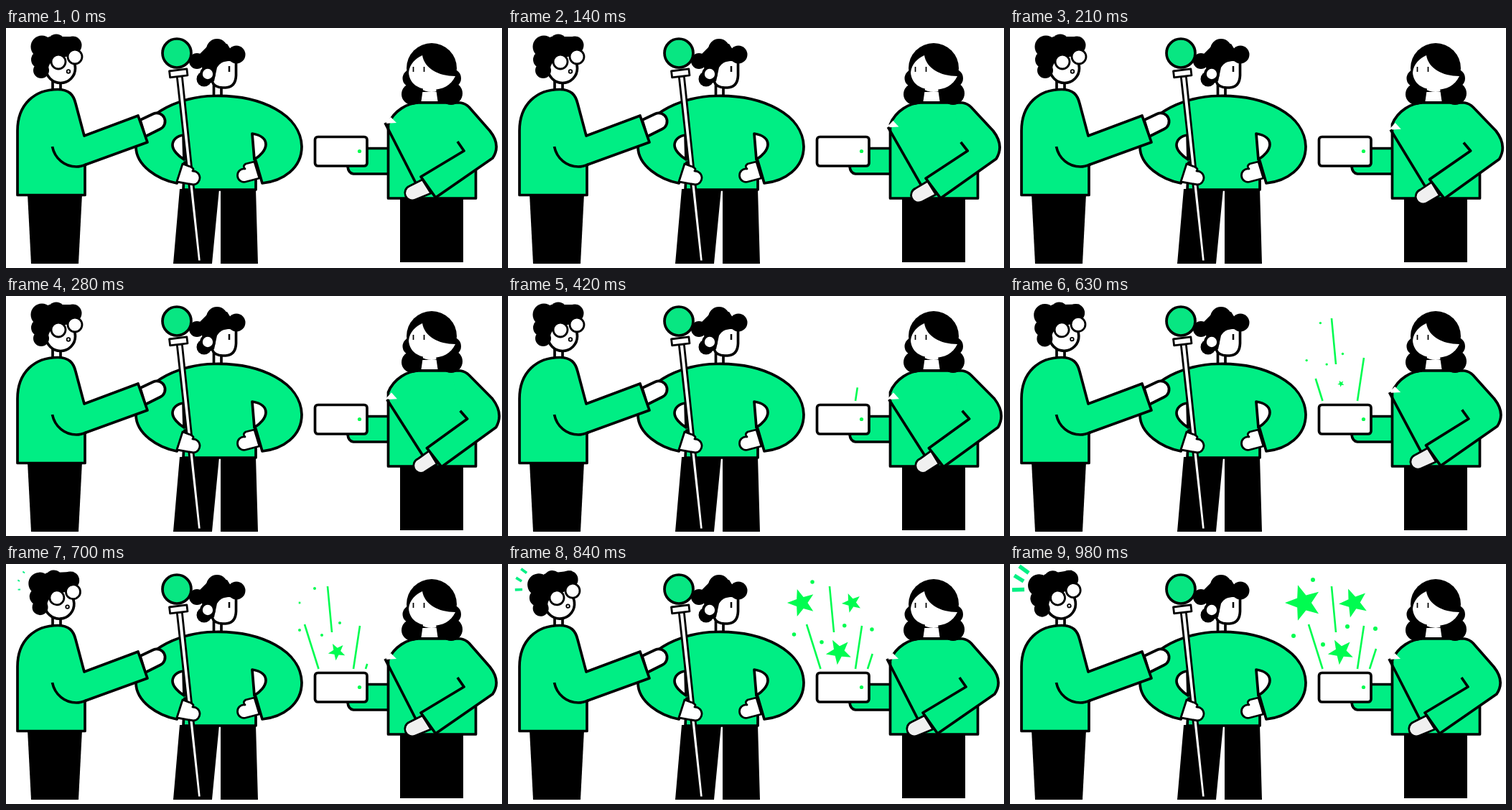
Write an HTML page that moves like this. It is 691 px wide and 334 px high and loops after 2030 ms.

```html
<!DOCTYPE html>
<html lang="en">
<head>
<meta charset="utf-8">
<title>Three people and a phone</title>
<style>
  html, body { margin: 0; width: 100%; height: 100%; overflow: hidden; background: #fff; }
  svg { display: block; width: 691px; height: 334px; }
  .o { stroke: #000; stroke-width: 3.7; stroke-linejoin: round; }
  .thin { stroke-width: 2.8; }
  .g { fill: #00ee84; }
  .w { fill: #fff; }
  .l { fill: none; }
  #burst { fill: #00fc50; }
  #burst path { stroke: #00fc50; stroke-width: 2.6; }
  #burst .dash { stroke: #00f084; }
</style>
</head>
<body>
<svg viewBox="0 0 691 334">
  <!-- middle man -->
  <path d="M242 224H297L287 328H233ZM299 224H348L351 328H299Z"/>
  <path class="o w" d="M289.500 78V98H300V78Z"/>
  <path class="o g" d="M247 225L249 187L238 216C212 211 181 192 181 165C182 124 238 95 290 94.500C356 93 411 121 412 165C412 195 386 213 357 216L348 185V225Z"/>
  <path class="o w" d="M247 149C238 150 232 156 232 163C232 170 240 178 248 183Z"/>
  <path class="o w" d="M343 147C356 149 362 155 362 162C362 170 354 178 346 183Z"/>
  <path class="o w thin" d="M346 186L334 189Q329 192 333 196A9.200 9.200 0 1 0 334 214L353 209Z"/>
  <path class="o w thin" d="M238.200 67H245.300L272.300 325H266.800Z"/>
  <rect class="o w thin" x="228" y="58.500" width="24.500" height="9" transform="rotate(-7 240 63)"/>
  <path class="o w thin" d="M246 189L257 193Q263 196 260 199A9.500 9.500 0 0 1 261 218L238 214Z"/>
  <path class="o w" d="M287 48V74Q290 83 302 83H306Q320 82 320.500 66V42Z"/>
  <path d="M268 38L282 24L308 22L322 44L318 47Q301 43 294 55L290 74L282 78L274 58Z"/>
  <circle cx="266" cy="46" r="11"/>
  <circle cx="294" cy="30" r="15"/>
  <circle cx="321" cy="37" r="12.500"/>
  <circle cx="276" cy="71" r="10.500"/>
  <circle class="o w" cx="281" cy="64" r="9"/>
  <circle class="o" cx="238" cy="35" r="20" fill="#08e682"/>
  <path class="o" d="M311 53V61" style="stroke-width:2.500"/>

  <!-- left man -->
  <path d="M30 231H106L101 328H35Z"/>
  <path class="o w" d="M65 72V90H76V72Z"/>
  <path class="o w" d="M187 128L205 119.500A11.500 11.500 0 0 1 215 140.500L194 151Z"/>
  <path class="o g" d="M16 232.500V143C16 106 40 85.500 72 85.500C88 85.500 94 93 97 105L109 150L184 122L197 159L110 190.500V232.500Z"/>
  <path class="o l" d="M64.500 165C68 182 82 193 98 193Q104 193 112 190"/>
  <g id="head">
    <circle class="o w" cx="76" cy="56" r="20.500"/>
    <path d="M38 30L60 12H98V30L84 40L66 42L60 52L56 66L42 56Z"/>
    <circle cx="50" cy="26" r="15.500"/>
    <circle cx="70" cy="21" r="12.500"/>
    <circle cx="93" cy="24" r="12.500"/>
    <circle cx="47" cy="44" r="12"/>
    <circle cx="49" cy="59" r="11"/>
    <circle class="o w thin" cx="73" cy="47" r="10"/>
    <circle class="o w thin" cx="96" cy="40" r="10"/>
    <circle class="w" cx="87" cy="60.500" r="2.300" stroke="#000" stroke-width="1.800"/>
  </g>

  <!-- woman -->
  <path d="M549 236H637V326H549Z"/>
  <path class="o g" d="M534 167.500H500L476 193Q477 202 484 203H534"/>
  <rect class="o w" x="430.500" y="151.500" width="72.500" height="40.500" rx="4"/>
  <circle cx="492.500" cy="171.500" r="2.600" fill="#00fc50"/>
  <path class="o g" d="M625 104H575C560 104 540 115 532.500 134V237H654.500V195"/>
  <path id="arm" class="o g"/>
  <path id="notch" class="w"/>
  <path id="wand" class="o"/>
  <path id="hand" class="o thin" fill="#f0f0f0"/>
  <circle cx="593" cy="56" r="35"/>
  <circle cx="565" cy="70" r="12.500"/>
  <circle cx="566" cy="92" r="15"/>
  <circle cx="621" cy="70" r="13"/>
  <circle cx="620" cy="91" r="16"/>
  <path d="M560 70H626V98L618 104H566Z"/>
  <path class="w" d="M581 84H599L601.500 102H578.500Z"/>
  <path d="M576 84Q593 94 610 84L604 89H580Z"/>
  <path class="w" d="M561 62C562 50 571 42 580 38C583 56 602 67 626 67C620 80 608 86 593 86C574 86 562 77 561 62Z"/>
  <path class="o" d="M567.500 54V61M582.500 54V61" style="stroke-width:1.700"/>

  <g id="burst"></g>
</svg>
<script>
const $ = id => document.getElementById(id);
const STEP = 70, LOOP = 2030, LAST = 14;
const clamp = v => Math.max(0, Math.min(1, v));
const mix = (a, b, t) => a + (b - a) * t;
const span = (k, a, b) => clamp((k - a) / (b - a));
const smooth = t => t * t * (3 - 2 * t);
const out = t => 1 - (1 - t) ** 2;

// x and y of the fixed end, x and y of the growing end, first and last step
const rays = [
  [484, 146, 493, 86, 5.1, 8],
  [454, 95, 448, 31, 6.5, 8],
  [435.5, 146, 416, 84, 8, 10],
  [501, 146, 510, 118, 9, 13]
];
// dashes beside the left head
const dashes = [
  [26, 12.5, 13, 3],
  [19, 24, 6, 16],
  [20, 35.5, 3, 36]
];
// x and y at step 10, x and y at the end, first step
const dots = [
  [430, 34, 422, 22, 9],
  [409, 92, 395, 100, 9],
  [440, 99, 436, 112, 9],
  [465, 82, 470, 87, 9],
  [501, 94, 509, 90, 11]
];
// centre, radius, angle of the first point, first and last step
const stars = [
  [461, 122, 18.5, -47, 8.5, 12],
  [409, 54, 26, -108, 9.8, 14],
  [479, 54, 21, -40, 10.5, 14]
];

function ray([x, y, u, v], t, width, kind = '') {
  return t > 0
    ? `<path class="${kind}" d="M${x} ${y}L${mix(x, u, t)} ${mix(y, v, t)}" style="stroke-width:${width}"/>`
    : '';
}

function star([x, y, r, turn, a, b], k) {
  const size = r * out(span(k, a, b));
  const points = Array.from({ length: 10 }, (_, i) => {
    const angle = (turn + i * 36) * Math.PI / 180;
    const d = i % 2 ? size * 0.42 : size;
    return `${x + d * Math.cos(angle)},${y + d * Math.sin(angle)}`;
  });
  return `<polygon points="${points.join(' ')}"/>`;
}

function dot([x, y, u, v, first], k) {
  if (k < first) return '';
  const t = k < 10 ? -0.3 : out(span(k, 10, LAST));
  return `<circle cx="${mix(x, u, t)}" cy="${mix(y, v, t)}" r="${mix(2, 3, t)}"/>`;
}

function drawArm(k) {
  const a = k < 10 ? Math.sin(Math.PI * k / 10) ** 1.5 : 0;
  const at = (x, y, dx, dy) => `${x + dx * a} ${y + dy * a} `;
  $('arm').setAttribute('d',
    `M620 104H633Q640 105 645 110L${at(674, 143, 4, 0)}Q${at(690, 163, 4, 1)}${at(678, 181, 5, 2)}` +
    `L${at(598.5, 236, 9, 2)}L${at(578, 207, 9, 5)}L${at(638, 171, 5, 0)}L${at(629, 158, 4, 2)}`);
  $('notch').setAttribute('d',
    `M${at(536, 124, 1, 11)}L${at(544, 132, 1, 12)}L${at(527, 133, 1, 12)}Z`);
  $('wand').setAttribute('d',
    `M${at(528, 132, 3, 13)}L${at(572, 218, 11, 7)}`);
  $('hand').setAttribute('d',
    `M${at(580, 211, 10, 5)}L${at(562, 220, 13, 7)}A10 10 0 0 0 ${at(570, 239, 13, 7)}` +
    `L${at(592, 230, 9, 4)}Z`);
}

function draw(now) {
  const k = Math.min(LAST, Math.floor(now % LOOP / STEP));
  drawArm(k);
  const tilt = smooth(span(k, 7.5, LAST));
  $('head').setAttribute('transform', `rotate(${-9 * tilt} 70 88)`);
  const grow = span(k, 9, LAST);
  $('burst').innerHTML =
    rays.map(r => ray(r, span(k, r[4], r[5]), 2.6)).join('') +
    dashes.map(d => ray(d, grow, mix(1, 5.5, grow), 'dash')).join('') +
    dots.map(d => dot(d, k)).join('') +
    stars.map(s => star(s, k)).join('');
}

const start = performance.now();
function tick() {
  draw(performance.now() - start);
  requestAnimationFrame(tick);
}
tick();
</script>
</body>
</html>
```
